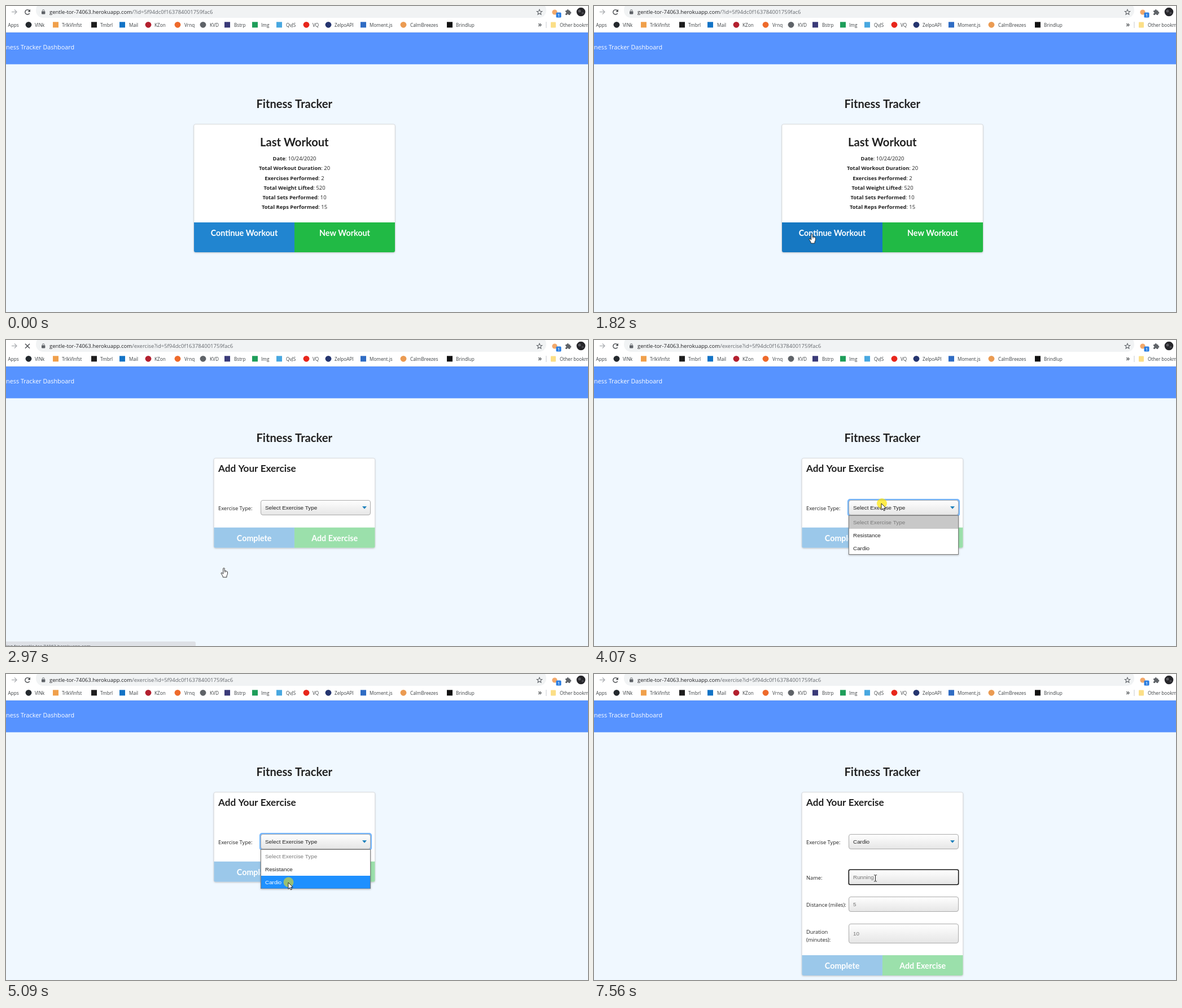
Write an HTML page with a canvas that moves like this. It is 1031 px wide and 543 px high and loops after 8 s.

```html
<!DOCTYPE html>
<html lang="en">
<head>
<meta charset="utf-8">
<title>Fitness Tracker</title>
<style>
html, body { margin: 0; width: 100%; height: 100%; overflow: hidden; background: #f0f8ff; }
canvas { display: block; width: 1031px; height: 543px; }
</style>
</head>
<body>
<canvas id="stage" width="1031" height="543"></canvas>
<script>
const ctx = document.getElementById('stage').getContext('2d');
const LOOP = 8000;
const UI = '"Open Sans", "Noto Sans", sans-serif';
const HEAD = 'Lato, sans-serif';
const FORM = '"Liberation Sans", Arial, sans-serif';
const INK = '#212121';
const HOST = 'gentle-tor-74063.herokuapp.com';
const ID = '5f94dc0f163784001759fac6';

function text(str, x, y, size, family, color = INK, weight = 400, align = 'left') {
  ctx.font = `${weight} ${size}px ${family}`;
  ctx.textAlign = align;
  ctx.fillStyle = color;
  ctx.fillText(str, x, y);
  return ctx.measureText(str).width;
}

function rect(x, y, w, h, color) {
  ctx.fillStyle = color;
  ctx.fillRect(x, y, w, h);
}

function round(x, y, w, h, r, fill, stroke, line = 1) {
  ctx.beginPath();
  ctx.roundRect(x, y, w, h, r);
  if (fill) { ctx.fillStyle = fill; ctx.fill(); }
  if (stroke) { ctx.strokeStyle = stroke; ctx.lineWidth = line; ctx.stroke(); }
}

function disc(x, y, r, color) {
  ctx.beginPath();
  ctx.arc(x, y, r, 0, 7);
  ctx.fillStyle = color;
  ctx.fill();
}

function shape(points, fill, stroke, line = 1, closed = true) {
  ctx.beginPath();
  points.forEach(([x, y]) => ctx.lineTo(x, y));
  if (closed) ctx.closePath();
  if (fill) { ctx.fillStyle = fill; ctx.fill(); }
  if (stroke) { ctx.strokeStyle = stroke; ctx.lineWidth = line; ctx.stroke(); }
}

function at(x, y, draw) {
  ctx.save();
  ctx.translate(x, y);
  draw();
  ctx.restore();
}

// Browser chrome

// label, text x, icon x, icon colour, square icon
const bookmarks = [
  ['VlNk', 51, 40, '#24292e'],
  ['TrlkVlnfst', 99, 88, '#f0a04b', true],
  ['Tmbrl', 167, 156, '#1d1d1d', true],
  ['Mail', 218, 206, '#1273c6', true],
  ['KZon', 263, 252, '#b3202f'],
  ['Vrnq', 316, 304, '#ee6a2b'],
  ['KVD', 361, 349, '#5f6368'],
  ['Bstrp', 404, 392, '#3a3a78', true],
  ['Img', 452, 441, '#1e9e5a', true],
  ['QvJS', 496, 484, '#48a8e0', true],
  ['VQ', 543, 532, '#e8261c'],
  ['ZelpoAPI', 582, 571, '#25356f'],
  ['Moment.js', 644, 633, '#2f6cc4', true],
  ['CalmBreezes', 716, 704, '#eb9b52'],
  ['Brindlup', 797, 786, '#111', true]
];

function reloadIcon() {
  ctx.beginPath();
  ctx.arc(0, 0, 4.1, 0.5, 5.6);
  ctx.strokeStyle = '#4a4d51';
  ctx.lineWidth = 1.5;
  ctx.stroke();
  shape([[5, -5], [5, -0.4], [0.4, -0.4]], '#4a4d51');
}

function stopIcon() {
  shape([[-4, -4], [4, 4]], null, '#4a4d51', 1.4, false);
  shape([[4, -4], [-4, 4]], null, '#4a4d51', 1.4, false);
}

function starIcon() {
  const pts = [];
  for (let i = 0; i < 10; i++) {
    const a = i * Math.PI / 5, r = i % 2 ? 2.2 : 4.9;
    pts.push([r * Math.sin(a), -r * Math.cos(a)]);
  }
  shape(pts, null, '#5f6368', 1.1);
}

function puzzleIcon() {
  round(-5, -3, 8.5, 8, 1, '#5f6368');
  disc(-0.8, -3.3, 1.8, '#5f6368');
  disc(3.6, 1, 1.8, '#5f6368');
  disc(-4.9, 1, 1.4, '#fff');
  disc(-0.8, 5, 1.4, '#fff');
}

function browser(path, loading) {
  rect(0, 0, 1031, 47, '#fff');
  rect(0, 46, 1031, 1, '#eceef1');
  shape([[10, 10.5], [19, 10.5]], null, '#a9acb0', 1.3, false);
  shape([[15, 6.5], [19, 10.5], [15, 14.5]], null, '#a9acb0', 1.3, false);
  at(38, 10.8, loading ? stopIcon : reloadIcon);

  round(53, -6, 904, 27, 13, '#f1f3f4');
  round(63, 9.2, 6.4, 5.2, 0.8, '#5f6368');
  ctx.beginPath();
  ctx.arc(66.2, 8.6, 1.9, Math.PI, 0);
  ctx.strokeStyle = '#5f6368';
  ctx.lineWidth = 1;
  ctx.stroke();
  const w = text(HOST, 77, 14, 9.5, UI, '#202124');
  text(path + ID, 77 + w, 14, 9.5, UI, '#63676c');

  at(945, 11, starIcon);
  disc(972, 11, 4.6, '#f2a96b');
  round(974.5, 11.5, 9, 9, 1.5, '#2a7de1');
  text('1', 979, 18.8, 7, UI, '#fff', 600, 'center');
  at(996, 11, puzzleIcon);
  disc(1018.5, 10.5, 7.8, '#26262a');
  disc(1016, 9, 2.5, '#5a5a60');
  disc(1021.5, 12.5, 2, '#47474d');

  text('Apps', 3.5, 36.6, 8.2, UI, '#3c4043');
  for (const [label, x, icon, color, square] of bookmarks) {
    if (square) rect(icon - 5, 28.3, 10, 10, color);
    else disc(icon, 33.3, 5.4, color);
    text(label, x, 36.6, 8.2, UI, '#3c4043');
  }
  text('»', 942.5, 37, 12, UI, '#3c4043', 600);
  rect(956.5, 28, 1, 11, '#c8cbd0');
  round(965, 28.5, 9, 10, 1, '#fbdf87');
  text('Other bookmarks', 981, 36.6, 8.2, UI, '#3c4043');
}

function statusBar(str, width, alpha = 1) {
  ctx.globalAlpha = alpha;
  round(-5, 535, width + 5, 20, 3, '#dee1e6');
  text(str, -16, 545.7, 8, UI, '#4c5054');
  ctx.globalAlpha = 1;
}

// Page parts

function pageHead() {
  rect(0, 47, 1031, 496, '#f0f8ff');
  rect(0, 47, 1031, 56.4, '#5793ff');
  text('Fitness Tracker Dashboard', 121, 76.5, 10.8, UI, '#fff', 400, 'right');
  text('Fitness Tracker', 510.7, 181, 20.15, HEAD, INK, 700, 'center');
}

function card(x, y, w, h) {
  ctx.save();
  ctx.shadowColor = '#bcbec2';
  ctx.shadowBlur = 3;
  ctx.shadowOffsetY = 1;
  round(x, y, w, h, 3, '#fff');
  ctx.restore();
  round(x - 0.2, y - 0.2, w + 0.4, h + 0.4, 3, '#fff', '#d0d2d5', 0.8);
}

function buttonPair(x, y, w, h, base, left, right) {
  const half = w / 2;
  round(x, y, half, h, [0, 0, 0, 3], left[1]);
  round(x + half, y, half, h, [0, 0, 3, 0], right[1]);
  text(left[0], x + half / 2, base, 14.3, HEAD, '#fff', 700, 'center');
  text(right[0], x + half * 1.5, base, 14.3, HEAD, '#fff', 700, 'center');
}

const summary = [
  ['Date', '10/24/2020'],
  ['Total Workout Duration', '20'],
  ['Exercises Performed', '2'],
  ['Total Weight Lifted', '520'],
  ['Total Sets Performed', '10'],
  ['Total Reps Performed', '15']
];

function lastWorkout(blue, green) {
  card(333, 210, 356, 227);
  text('Last Workout', 510.8, 248.5, 20.15, HEAD, INK, 700, 'center');
  summary.forEach(([label, value], i) => {
    const y = 274.4 + i * 17.05, rest = ': ' + value;
    ctx.font = `700 9.4px ${UI}`;
    const a = ctx.measureText(label).width;
    ctx.font = `400 9.4px ${UI}`;
    const x = 511 - (a + ctx.measureText(rest).width) / 2;
    text(label, x, y, 9.4, UI, INK, 700);
    text(rest, x + a, y, 9.4, UI, INK);
  });
  buttonPair(333, 384, 356, 53, 407.7, ['Continue Workout', blue], ['New Workout', green]);
}

function field(y, h, value, color, focus) {
  if (focus === 'ring') {
    ctx.save();
    ctx.shadowColor = 'rgba(59,153,252,.7)';
    ctx.shadowBlur = 1;
    round(449, y - 2, 199, h + 4, 5, '#76b7fd');
    ctx.restore();
  }
  const fill = ctx.createLinearGradient(0, y, 0, y + h);
  fill.addColorStop(0, '#fff');
  fill.addColorStop(1, '#e5e5e5');
  if (focus === 'dark') round(451.3, y + 0.3, 194.4, h - 0.6, 2.5, fill, '#161616', 1.6);
  else round(451.5, y + 0.5, 194, h - 1, 3.5, fill, '#aaa', 1);
  text(value, 459, y + h / 2 + 3.6, 9.9, FORM, color);
}

function selectBox(value, ring) {
  field(284, 27, value, '#222', ring && 'ring');
  shape([[631, 295.3], [639, 295.3], [635, 299.8]], '#0f7cba');
}

function dropdown(active) {
  ctx.save();
  ctx.shadowColor = 'rgba(0,0,0,.3)';
  ctx.shadowBlur = 3;
  ctx.shadowOffsetY = 1;
  rect(451, 311, 195, 70, '#7c7c7c');
  ctx.restore();
  rect(452, 312, 193, 68, '#fff');
  ['Select Exercise Type', 'Resistance', 'Cardio'].forEach((label, i) => {
    const on = i === active, y = 312 + i * 23;
    if (on) rect(452, y, 193, i === 2 ? 22.5 : 23, i ? '#1e90ff' : '#c8c8c8');
    text(label, 459, 327 + i * 22.8, 9.9, FORM, i ? (on ? '#fff' : '#222') : '#7a7a7a');
  });
}

function label(str, y) { text(str, 376, y, 9.3, UI); }

function exerciseForm(cardio, ring, nameFocus) {
  const foot = cardio ? 499 : 332.7;
  card(368.4, 210, 285.1, foot - 173.9);
  text('Add Your Exercise', 376, 234.3, 17.16, HEAD, INK, 700);
  label('Exercise Type:', 302);
  selectBox(cardio ? 'Cardio' : 'Select Exercise Type', ring);
  if (cardio) {
    label('Name:', 364.8);
    label('Distance (miles):', 412.8);
    label('Duration', 461.3);
    label('(minutes):', 474.8);
    field(347, 27, 'Running', '#757575', nameFocus && 'dark');
    field(395, 27, '5', '#757575');
    field(443, 35, '10', '#757575');
  }
  buttonPair(368.4, foot, 285.1, 36.1, foot + 23.8, ['Complete', '#9bc8ea'], ['Add Exercise', '#9be0ab']);
}

// Pointers, drawn from their hot spot

function arrow() {
  shape([[0, 0], [0, 11.5], [2.7, 9], [4.5, 13], [6.4, 12.2], [4.6, 8.3], [8.2, 8.3]], '#fff', '#111', 0.9);
}

function hand() {
  ctx.lineJoin = 'round';
  shape([[-1.3, 0.8], [0, 0], [1.2, 0.8], [1.2, 5], [3, 5.2], [4.7, 5.8], [6.4, 6.8],
    [6.4, 11], [5, 14], [5, 16.5], [-1.6, 16.5], [-2.2, 14], [-5, 9.6], [-4.4, 8.4],
    [-3, 8.8], [-1.3, 10.6]], '#fff', '#1b1b1b', 0.9);
  for (const x of [1.2, 3]) shape([[x, 5.2], [x, 8]], null, '#1b1b1b', 0.6, false);
}

function ibeam() {
  ctx.fillStyle = '#222';
  ctx.fillRect(-0.5, -5.5, 1, 11);
  for (const y of [-6, 5.2]) {
    ctx.fillRect(-2.6, y, 2.1, 0.9);
    ctx.fillRect(0.5, y, 2.1, 0.9);
  }
}

function glow(x, y, alpha) { disc(x, y, 9, `rgba(255,230,0,${alpha})`); }

// Motion

const ease = p => p * p * (3 - 2 * p);

// Progress from 0 to 1 in n screen updates between a and b
function steps(t, a, b, n) {
  const k = Math.floor((t - a) / (b - a) * (n - 1) + 1e-6);
  return Math.max(0, Math.min(1, k / (n - 1)));
}

function along(points, p) {
  const s = p * (points.length - 1), i = Math.min(points.length - 2, Math.floor(s)), f = s - i;
  const [a, b] = [points[i], points[i + 1]];
  return [a[0] + (b[0] - a[0]) * f, a[1] + (b[1] - a[1]) * f];
}

const entry = [[826, 531], [640, 490], [440, 452], [392, 420], [376, 397], [373, 408]];

function pointer(t) {
  if (t < 730) return null;
  if (t < 1590) return along(entry, ease(steps(t, 730, 1510, 11)));
  if (t < 3380) return along([[373, 408], [386, 404.5]], (steps(t, 1590, 1820, 4) * 3 + 1) / 4);
  if (t < 4210) return along([[386, 404.5], [509, 290]], ease(steps(t, 3380, 3990, 9)));
  if (t < 5240) return along([[509, 290], [500, 370]], ease(steps(t, 4210, 5000, 11)));
  if (t < 5700) return [502, 369.7];
  if (t < 5780) return [502, 366];
  return t < 6410 ? [502, 363] : [498.5, 362.3];
}

function draw(t) {
  const between = (a, b) => t >= a && t < b;
  const pos = pointer(t);
  const first = t < 2900;

  pageHead();
  browser(first ? '/?id=' : '/exercise?id=', between(2590, 3150));

  let over = false;
  if (first) {
    const inside = pos && pos[1] > 384 && pos[1] < 437 && pos[0] > 333 && pos[0] < 689;
    const left = inside && pos[0] < 511;
    const blue = t >= 2360 ? '#0d71bb' : left ? '#1678c2' : '#2185d0';
    lastWorkout(blue, inside && !left ? '#16ab39' : '#21ba45');
    over = inside;
  } else {
    exerciseForm(t >= 5170, between(3990, 6010), t >= 6010);
    if (between(4070, 5170)) dropdown(pos[1] < 335 ? 0 : pos[1] < 358 ? 1 : 2);
  }

  if (between(1970, 2970)) statusBar(`https://${HOST}/exercise?id=${ID}`, 292, t < 2050 ? 0.5 : 1);
  if (between(2970, 3380)) statusBar(`Waiting for ${HOST}...`, 336);

  if (between(6010, 6550) || between(7100, 7560)) rect(459, 355, 1, 11, '#111');

  if (between(2360, 2510)) glow(386, 405, 0.6);
  if (between(3990, 4140)) glow(510, 290, 0.7);
  if (between(5090, 5170)) glow(500.5, 369.5, 0.55);
  if (between(6010, 6090)) glow(501, 362, 0.55);

  if (pos) at(pos[0], pos[1], t >= 5240 ? ibeam : over || between(2900, 3380) ? hand : arrow);
}

function frame(now) {
  draw(now % LOOP);
  requestAnimationFrame(frame);
}
requestAnimationFrame(frame);
</script>
</body>
</html>
```
